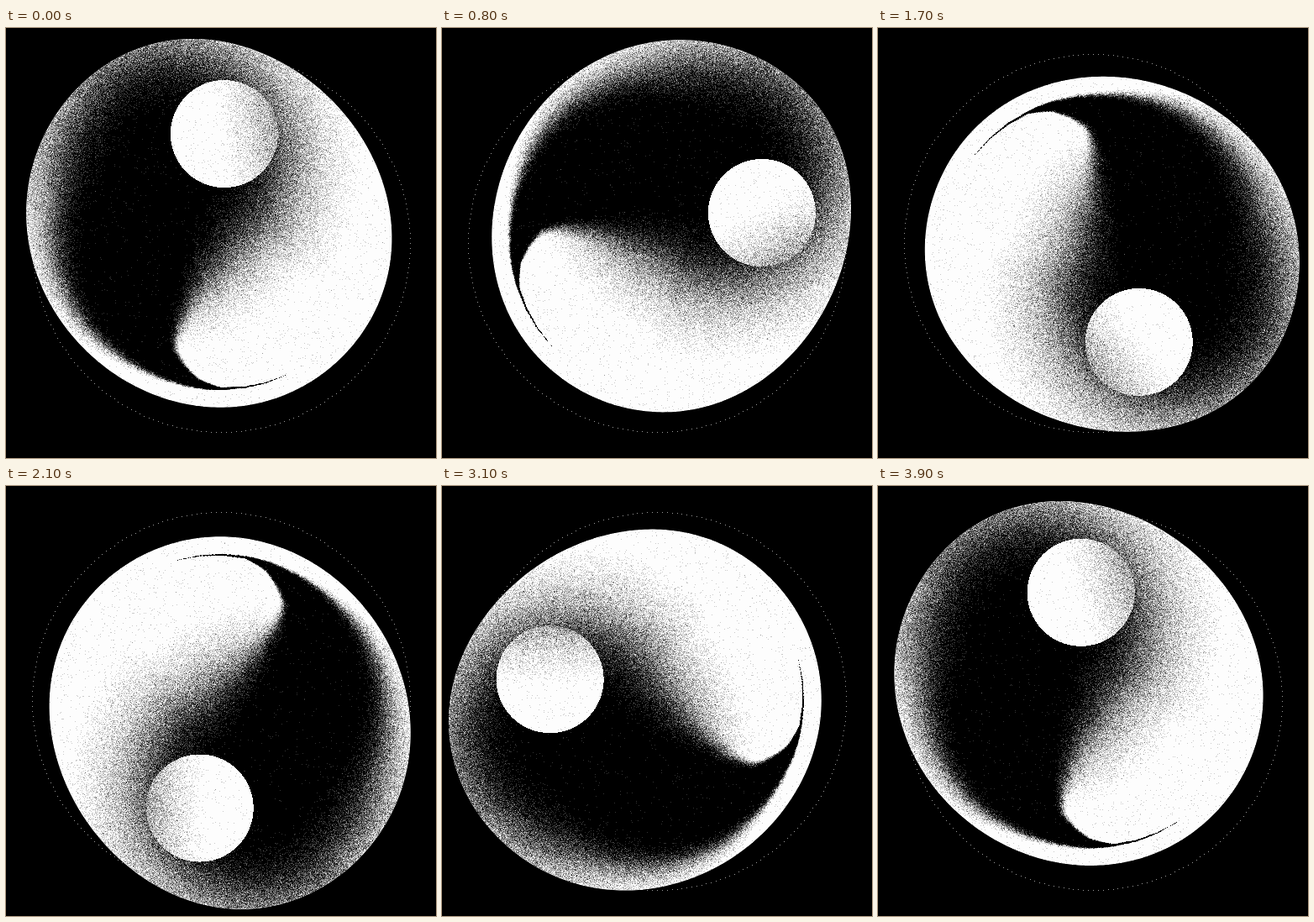
Recreate the animation shown at these times as an HTML page with a canvas. Size 512x512 px, loop 4 s.

```html
<!DOCTYPE html>
<html lang="en">
<head>
<meta charset="utf-8">
<title>Rotating stipple</title>
<style>
  html, body { margin: 0; width: 100%; height: 100%; overflow: hidden; background: #000; }
  canvas { display: block; width: 512px; height: 512px; }
</style>
</head>
<body>
<canvas id="stage" width="512" height="512"></canvas>
<script>
const SIZE = 512, MID = 256, STEP = 100, STEPS = 40;
const TAU = Math.PI * 2, DEG = TAU / 360;
const STEP_TURN = 9.025 * DEG;
const WHITE = 253, GRAINS = 5;
const ctx = document.getElementById('stage').getContext('2d', { willReadFrequently: true });

// Outline: distance of the tangent line every 30 degrees, smoothed by four harmonics.
const reach = [203.5, 199.5, 196.8, 195.5, 199, 212.5, 231.5, 247.5, 252, 243.5, 222, 208];

function outlinePoint(a) {
  let h = 0, slope = 0;
  reach.forEach((value, i) => {
    const x = a - i * 30 * DEG;
    h += value / 12;
    for (let k = 1; k <= 4; k++) {
      h += value * Math.cos(k * x) / 6;
      slope -= value * k * Math.sin(k * x) / 6;
    }
  });
  return [h * Math.cos(a) - slope * Math.sin(a), h * Math.sin(a) + slope * Math.cos(a)];
}

const outline = new Path2D();
for (let i = 0; i < 360; i++) outline.lineTo(...outlinePoint(i * DEG));
outline.closePath();

// Dark swirl: angle, orbit, radius, sharpness of discs along a spiral.
const swirl = [
  [63.4, 175.5, 0.1, 16], [90, 173.5, 1.5, 16], [100, 169.5, 6, 16],
  [107, 164, 11.5, 18], [120, 154, 23.5, 18], [135, 136, 46, 18],
  [155, 117, 75, 15], [180, 103, 100, 11], [210, 97, 120, 8], [239, 114, 141, 6.4]
];
const SPLIT = 3;
const discs = [];
for (let i = 0; i < (swirl.length - 1) * SPLIT + 1; i++) {
  const at = Math.min(Math.floor(i / SPLIT), swirl.length - 2);
  const t = i / SPLIT - at;
  const [angle, orbit, radius, sharp] = swirl[at].map((v, j) => v + (swirl[at + 1][j] - v) * t);
  discs.push({ x: orbit * Math.cos(angle * DEG), y: orbit * Math.sin(angle * DEG), radius, sharp });
}
const links = discs.slice(1).map((b, i) => {
  const a = discs[i], dx = b.x - a.x, dy = b.y - a.y;
  return { a, dx, dy, len2: dx * dx + dy * dy, grow: b.radius - a.radius, soften: b.sharp - a.sharp };
});

function swirlLight(x, y) {
  let dark = -50;
  for (const { a, dx, dy, len2, grow, soften } of links) {
    const px = x - a.x, py = y - a.y;
    const t = Math.max(0, Math.min(1, (px * dx + py * dy) / len2));
    const ex = px - t * dx, ey = py - t * dy;
    const ratio = (a.radius + t * grow) ** 2 / (ex * ex + ey * ey + 1e-6);
    dark = Math.max(dark, (a.sharp + t * soften) * 0.5 * Math.log(ratio));
  }
  return Math.max(0.002, Math.min(0.995, 1.04 / (1 + Math.exp(dark))));
}

const GRID = 768, SCALE = GRID / SIZE;
const light = new Float32Array(GRID * GRID);
for (let j = 0; j < GRID; j++) {
  for (let i = 0; i < GRID; i++) {
    light[j * GRID + i] = swirlLight((i + 0.5) / SCALE - MID, (j + 0.5) / SCALE - MID);
  }
}

const BALL = 64;
const ballX = 130 * Math.cos(-88.3 * DEG), ballY = 130 * Math.sin(-88.3 * DEG);
const shadeX = Math.cos(-10 * DEG), shadeY = Math.sin(-10 * DEG);

function lightAt(x, y) {
  const bx = x - ballX, by = y - ballY;
  if (bx * bx + by * by < BALL * BALL) {
    const u = Math.max(0, ((bx * shadeX + by * shadeY) / BALL + 0.2) / 1.2);
    return 0.996 - 0.36 * u * u;
  }
  const i = Math.max(0, Math.min(GRID - 1, Math.floor((x + MID) * SCALE)));
  const j = Math.max(0, Math.min(GRID - 1, Math.floor((y + MID) * SCALE)));
  return light[j * GRID + i];
}

function random(n) {
  n = Math.imul(n ^ (n >>> 16), 0x45d9f3b);
  n = Math.imul(n ^ (n >>> 15), 0x2c1b3c6d);
  return ((n ^ (n >>> 16)) >>> 0) / 4294967296;
}

// Each pixel averages a few black or white grains.
function grainTone(seed, chance) {
  let lit = 0;
  for (let g = 0; g < GRAINS; g++) {
    if (random(seed * GRAINS + g + 1) < chance) lit++;
  }
  return WHITE * lit / GRAINS;
}

function drawRing() {
  ctx.fillStyle = '#969696';
  const dots = 240;
  for (let i = 0; i < dots; i++) {
    const a = i / dots * TAU;
    ctx.fillRect(Math.round(MID + 225 * Math.cos(a)), Math.round(MID + 225 * Math.sin(a)), 1, 1);
  }
}

function draw(step) {
  const turn = step * STEP_TURN, c = Math.cos(turn), s = Math.sin(turn);
  ctx.fillStyle = '#000';
  ctx.fillRect(0, 0, SIZE, SIZE);
  drawRing();
  ctx.save();
  ctx.translate(MID, MID);
  ctx.rotate(turn);
  ctx.fillStyle = '#fff';
  ctx.fill(outline);
  ctx.restore();

  const image = ctx.getImageData(0, 0, SIZE, SIZE), px = image.data;
  for (let k = 0; k < SIZE * SIZE; k++) {
    if (px[k * 4] < 200) continue;
    const x = k % SIZE + 0.5 - MID, y = Math.floor(k / SIZE) + 0.5 - MID;
    const tone = grainTone(k + step * SIZE * SIZE, lightAt(x * c + y * s, y * c - x * s));
    px[k * 4] = px[k * 4 + 1] = px[k * 4 + 2] = tone;
  }
  ctx.putImageData(image, 0, 0);
}

let shown = -1;
const start = performance.now();
function tick() {
  const step = Math.floor((performance.now() - start) / STEP) % STEPS;
  if (step !== shown) draw(shown = step);
  requestAnimationFrame(tick);
}
tick();
</script>
</body>
</html>
```
